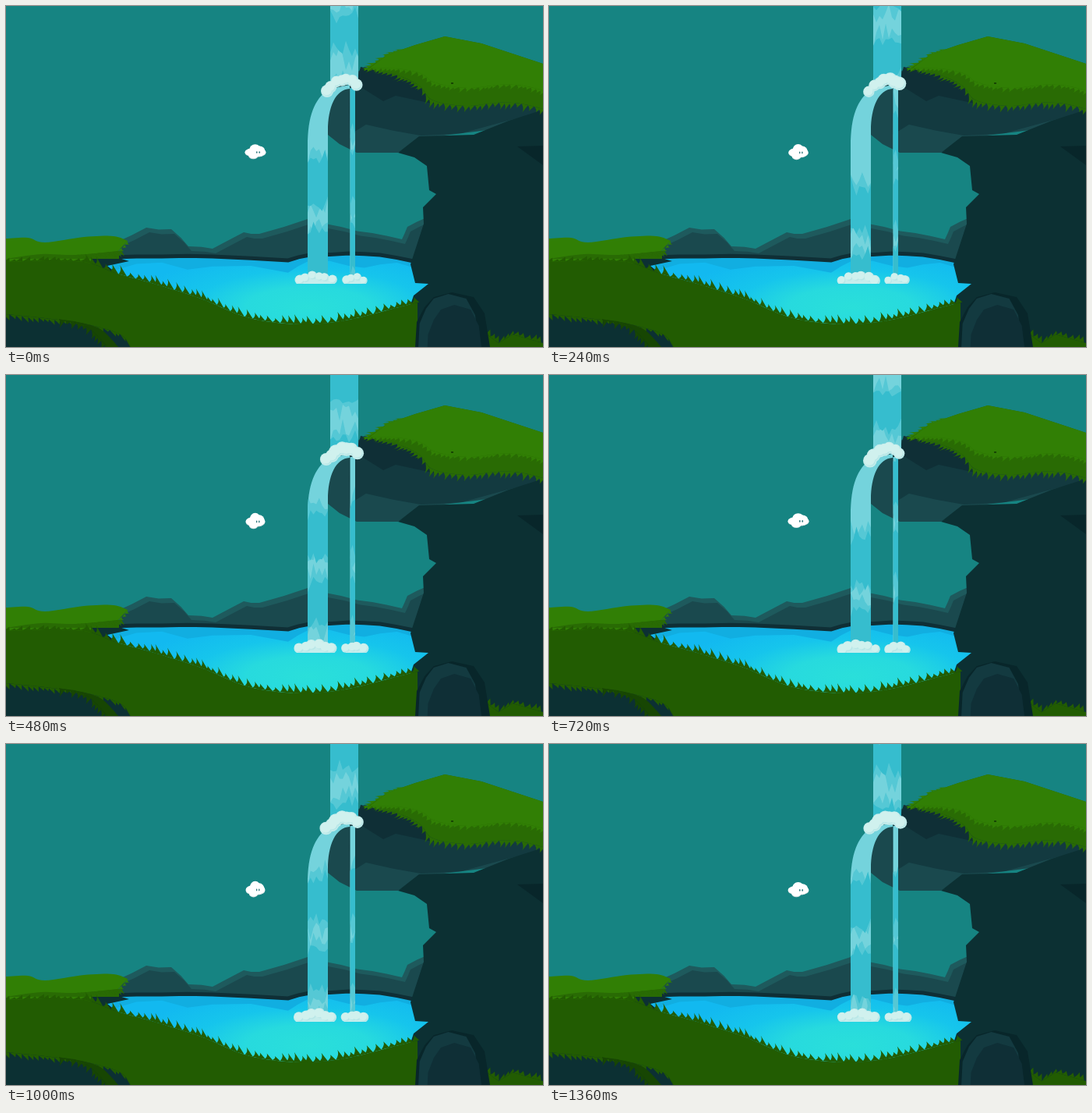
Animation of 689 by 437 pixels, one loop 1.4 s. Source, as an HTML page with a canvas:

```html
<!DOCTYPE html>
<html lang="en">
<head>
<meta charset="utf-8">
<title>Waterfall</title>
<style>
html, body { margin: 0; width: 100%; height: 100%; overflow: hidden; background: #168482; }
canvas { display: block; }
</style>
</head>
<body>
<canvas id="stage" width="689" height="437"></canvas>
<script>
const W = 689, H = 437, LOOP = 1400, STEP = 40, TAU = Math.PI * 2;
const ctx = document.getElementById('stage').getContext('2d');
const water = { light: '#74d3dc', middle: '#55c8d5', deep: '#36bdce' };
const grass = { bright: '#317f05', middle: '#296b04', dark: '#225c02', shade: '#174603' };
const rock = { pale: '#1e5a5d', light: '#1a494e', middle: '#133a40', dark: '#0f2f36', black: '#0c3033', shadow: '#08262a' };

function random(seed) {
  let s = Math.floor(seed * 7919) + 17;
  return () => (s = (s * 16807) % 2147483647) / 2147483647;
}

const points = text => text.split(' ').map(pair => pair.split(',').map(Number));
const shifted = (pts, dx, dy) => pts.map(([x, y]) => [x + dx, y + dy]);

// Catmull-Rom curve through a few points
function curve(text, steps = 8) {
  const p = points(text), out = [];
  for (let i = 0; i < p.length - 1; i++) {
    const [a, b, c, d] = [p[Math.max(0, i - 1)], p[i], p[i + 1], p[Math.min(p.length - 1, i + 2)]];
    for (let s = 0; s < steps; s++) {
      const t = s / steps;
      out.push([0, 1].map(n => b[n] + 0.5 * t * (c[n] - a[n] +
        t * (2 * a[n] - 5 * b[n] + 4 * c[n] - d[n] + t * (3 * (b[n] - c[n]) + d[n] - a[n])))));
    }
  }
  return [...out, p[p.length - 1]];
}

// Polyline with seeded dents between its points
function rough(text, amount, seed) {
  const rnd = random(seed);
  const dent = () => (rnd() - 0.5) * 2 * amount;
  return points(text).flatMap(([x, y], i, all) => {
    const [nx, ny] = all[i + 1] || [x, y];
    return [[x, y], [(x + nx) / 2 + dent(), (y + ny) / 2 + dent()]];
  });
}

function trace(g, pts) {
  g.beginPath();
  pts.forEach(([x, y]) => g.lineTo(x, y));
}

function poly(g, color, pts) {
  trace(g, pts);
  g.fillStyle = color;
  g.fill();
}

// Close a line down (or up) to a level
function ground(g, color, line, level = H) {
  poly(g, color, [...line, [line[line.length - 1][0], level], [line[0][0], level]]);
}

function oval(g, x, y, rx, ry = rx) {
  g.beginPath();
  g.ellipse(x, y, rx, ry, 0, 0, TAU);
  g.fill();
}

function blades(g, color, line, dx, dy, gap, seed) {
  const rnd = random(seed);
  let left = 0;
  g.fillStyle = color;
  for (let i = 1; i < line.length; i++) {
    const [ax, ay] = line[i - 1], [bx, by] = line[i];
    const len = Math.hypot(bx - ax, by - ay) || 1, ux = (bx - ax) / len, uy = (by - ay) / len;
    for (; left < len; left += gap * (0.7 + rnd() * 0.6)) {
      const x = ax + ux * left, y = ay + uy * left, k = 0.5 + rnd() * 0.7;
      g.beginPath();
      g.moveTo(x - ux * gap * 0.6, y - uy * gap * 0.6);
      g.quadraticCurveTo(x + dx * k * 0.2, y + dy * k * 0.5, x + dx * k, y + dy * k);
      g.lineTo(x + ux * gap * 0.6, y + uy * gap * 0.6);
      g.fill();
    }
    left -= len;
  }
}

function drawBackRocks(g) {
  const ridge = rough('143,302 180,284 212,286 234,308 265,311 305,290 325,292 387,273 430,283 470,291 508,299 515,283 540,271', 1.5, 4);
  ground(g, rock.pale, ridge, 325);
  ground(g, rock.light, shifted(ridge, 4, 6), 325);
}

function drawLake(g) {
  const shore = rough('135,322 200,321 265,321 362,326 390,319 440,317 480,319 523,327', 0.8, 6);
  g.save();
  trace(g, [...shore, ...points('542,345 542,360 525,400 300,412 115,332')]);
  g.clip();
  g.translate(388, 386);
  g.scale(1, 0.32);
  const glow = g.createRadialGradient(0, 0, 0, 0, 0, 230);
  glow.addColorStop(0, '#2adfda');
  glow.addColorStop(0.35, '#27dade');
  glow.addColorStop(0.65, '#16c5ec');
  glow.addColorStop(1, '#12b9f0');
  g.fillStyle = glow;
  g.fillRect(-400, -400, 800, 800);
  g.restore();
  const reflection = shore.map(([x, y]) => [x, y + 12 + 6 * Math.sin(x / 17)]);
  poly(g, '#11aee1', [...shore, ...reflection.reverse()]);
  trace(g, shore);
  g.strokeStyle = rock.dark;
  g.lineWidth = 5;
  g.stroke();
}

function drawCliff(g) {
  poly(g, rock.light, points('413,165 413,112 460,78 689,120 689,150 530,170 503,188 450,188 428,177'));
  poly(g, rock.middle, rough('441,165 441,100 470,82 689,120 689,135 585,163 532,166 462,152', 1, 3));
  poly(g, rock.dark, points('449,100 455,78 530,96 556,127 500,115 484,122'));
  poly(g, rock.black, points('503,188 530,167 600,165 645,147 689,133 689,437 515,437 516,392 523,371 542,356 525,355 519,331 536,279 535,258 552,241 543,236 540,205 524,194'));
  poly(g, rock.shadow, points('656,180 689,179 689,204'));
}

function drawCliffGrass(g) {
  const edge = curve('463,80 500,88 530,102 548,121 590,128 630,124 660,125 689,132');
  const crest = points('689,74 610,48 563,39 525,50 490,62');
  poly(g, grass.middle, [...edge, ...crest]);
  blades(g, grass.middle, edge.slice(0, 18), -8, 5, 6, 3);
  blades(g, grass.middle, edge.slice(16), -3, 9, 7, 4);
  const fold = edge.map(([x, y], i) => [x + 3, y - 23 * Math.min(1, i / 24)]);
  poly(g, grass.bright, [...fold, ...crest]);
  blades(g, grass.bright, fold, -4, 6, 7, 5);
  blades(g, grass.bright, points('463,81 490,62 513,54'), -8, -1, 7, 6);
  g.fillStyle = grass.shade;
  g.fillRect(571, 98, 3, 2);
}

function drawShoreGrass(g) {
  poly(g, rock.black, points('95,323 145,323 158,327 130,333 145,345 95,340'));
  const mound = curve('0,298 28,297 50,303 100,296 138,295 156,301');
  ground(g, grass.bright, [...mound, [142, 316], [110, 323]], 332);
  blades(g, grass.bright, points('140,297 156,301 150,309 140,317'), 6, 3, 5, 8);
  const fold = curve('0,324 45,318 90,319 145,314');
  ground(g, grass.middle, fold, 324);
  blades(g, grass.middle, fold.slice(16), 7, 6, 6, 9);

  const bank = curve('0,328 60,326 105,329 140,342 190,356 250,375 300,396 340,405 390,408 440,402 500,387 528,380');
  ground(g, grass.dark, bank);
  blades(g, grass.dark, bank.slice(16), -3, -11, 9, 12);
  blades(g, grass.dark, bank.slice(0, 17), 4, -5, 8, 13);

  const hollow = curve('0,395 50,400 100,407 145,420 160,437');
  ground(g, rock.black, hollow);
  blades(g, grass.dark, hollow, 4, 7, 7, 15);
  const tuft = curve('72,402 105,412 130,437');
  poly(g, grass.shade, [...tuft, ...shifted(tuft, 16, 2).reverse()]);
  blades(g, grass.shade, tuft, -3, 9, 7, 16);
}

function drawBoulder(g) {
  const tufts = points('605,412 632,432 650,421 689,432');
  ground(g, grass.dark, tufts);
  blades(g, grass.dark, tufts, 3, -7, 7, 18);
  const outline = points('525,437 527,405 537,386 549,373 572,367 600,373 614,394 621,437');
  poly(g, rock.shadow, outline);
  poly(g, rock.middle, outline.map(([x, y]) => [529 + (x - 525) * 0.82, y + 2]));
  poly(g, rock.dark, outline.map(([x, y]) => [540 + (x - 525) * 0.75, y + 16]));
}

function makeScenery() {
  const canvas = document.createElement('canvas');
  canvas.width = W;
  canvas.height = H;
  const g = canvas.getContext('2d');
  g.fillStyle = '#168482';
  g.fillRect(0, 0, W, H);
  [drawBackRocks, drawLake, drawCliff, drawCliffGrass, drawShoreGrass, drawBoulder].forEach(draw => draw(g));
  return canvas;
}

// Dark bands repeat every PERIOD pixels and fall CYCLES periods per loop
const PERIOD = 90, CYCLES = 8;
const falls = [
  { shape: new Path2D('M416 0H452V101H416Z'), x: 416, w: 36, first: 10, length: 50, clear: -PERIOD },
  { shape: new Path2D('M387 350V180C387 140 396 120 413 107L441 101V106C423 107 413 129 413 160V350Z'), x: 387, w: 26, first: 195, length: 63, clear: 165 },
  { shape: new Path2D('M441.5 105H448V350H441.5Z'), x: 441.5, w: 6.5, first: 185, length: 70, clear: 90 }
];

// A band with long pointed teeth above and below
function band(fall, top, length, seed, tooth) {
  const rnd = random(seed), n = Math.max(2, Math.round(fall.w / 4)), slice = fall.w / n;
  const side = (y, up) => Array.from({ length: n + 1 }, (_, i) =>
    [fall.x + i * slice, y + (i % 2 === up ? 1 : 0.3) * tooth * (rnd() - 0.5)]);
  return [...side(top, 0), ...side(top + length, 1).reverse()];
}

function drawFall(fall, t) {
  const turns = t / LOOP * CYCLES, cycle = Math.floor(turns);
  ctx.save();
  ctx.clip(fall.shape);
  ctx.fillStyle = water.light;
  ctx.fillRect(380, 0, 80, H);
  for (let j = -4; j < 4; j++) {
    const top = fall.first + (turns - cycle + j) * PERIOD;
    if (top < fall.clear || top > H) continue;
    const seed = (j - cycle + 2 * CYCLES) % CYCLES + fall.w;
    poly(ctx, water.middle, band(fall, top - 5, fall.length + 11, seed + 20, 34));
    poly(ctx, water.deep, band(fall, top + 3, fall.length - 6, seed, 28));
  }
  ctx.restore();
}

// Each foam is a row of puffs along an arch u = 0..1
const foams = [
  { count: 7, floor: 119, r: 8, at: u => [411 + 39 * u, 109 - 15 * Math.sin(2.5 * u)] },
  { count: 6, floor: 356, r: 6.5, at: u => [376 + 42 * u, 351 - 5 * Math.sin(Math.PI * u)] },
  { count: 4, floor: 356, r: 5.8, at: u => [436 + 22 * u, 351 - 3 * Math.sin(Math.PI * u)] }
];

function drawFoam({ count, floor, r, at }, t) {
  const puffs = Array.from({ length: count }, (_, i) => {
    const [x, y] = at(i / (count - 1)), a = t / LOOP * TAU * CYCLES + i * 2.4;
    return [x + Math.cos(a), y + Math.sin(a), r + 0.8 * Math.sin(a * 2 + i)];
  });
  ctx.save();
  ctx.beginPath();
  ctx.rect(0, 0, W, floor);
  ctx.clip();
  ctx.fillStyle = '#c6edec';
  puffs.forEach(([x, y, size]) => oval(ctx, x, y, size));
  if (floor > 300) ctx.fillRect(at(0)[0], 350, at(1)[0] - at(0)[0], 6);
  ctx.fillStyle = '#b9e7e7';
  puffs.forEach(([x, y, size]) => oval(ctx, x + 1, y + 1, size * 0.7));
  ctx.fillStyle = '#d0f1ee';
  puffs.forEach(([x, y, size]) => oval(ctx, x - 0.5, y - 0.8, size * 0.78));
  ctx.restore();
}

function drawCloud(t) {
  const stretch = 0.05 * Math.cos((t / 700 - 0.05) * TAU);
  const body = (color, dy) => {
    ctx.fillStyle = color;
    oval(ctx, 0, 0.5 + dy, 12.8, 6);
    oval(ctx, -0.3, -3 + dy, 7);
    oval(ctx, 5, -0.8 + dy, 6.8);
    oval(ctx, -2.5, 4.6 + dy, 6, 4.4);
  };
  ctx.save();
  ctx.translate(320, 187 + 0.5 * Math.sin(t / LOOP * TAU));
  ctx.scale(1 + stretch, 1 - stretch);
  body('#cddbdc', 0.6);
  body('#fff', -0.3);
  ctx.fillStyle = '#337b80';
  [1.7, 5].forEach(x => oval(ctx, x, 0.5, 0.8, 1.4));
  ctx.restore();
}

const scenery = makeScenery();
const start = performance.now();

function frame(now) {
  const t = Math.floor((Math.max(0, now - start) % LOOP) / STEP) * STEP;
  ctx.drawImage(scenery, 0, 0);
  falls.forEach(fall => drawFall(fall, t));
  foams.forEach(foam => drawFoam(foam, t));
  drawCloud(t);
  requestAnimationFrame(frame);
}
frame(start);
</script>
</body>
</html>
```
